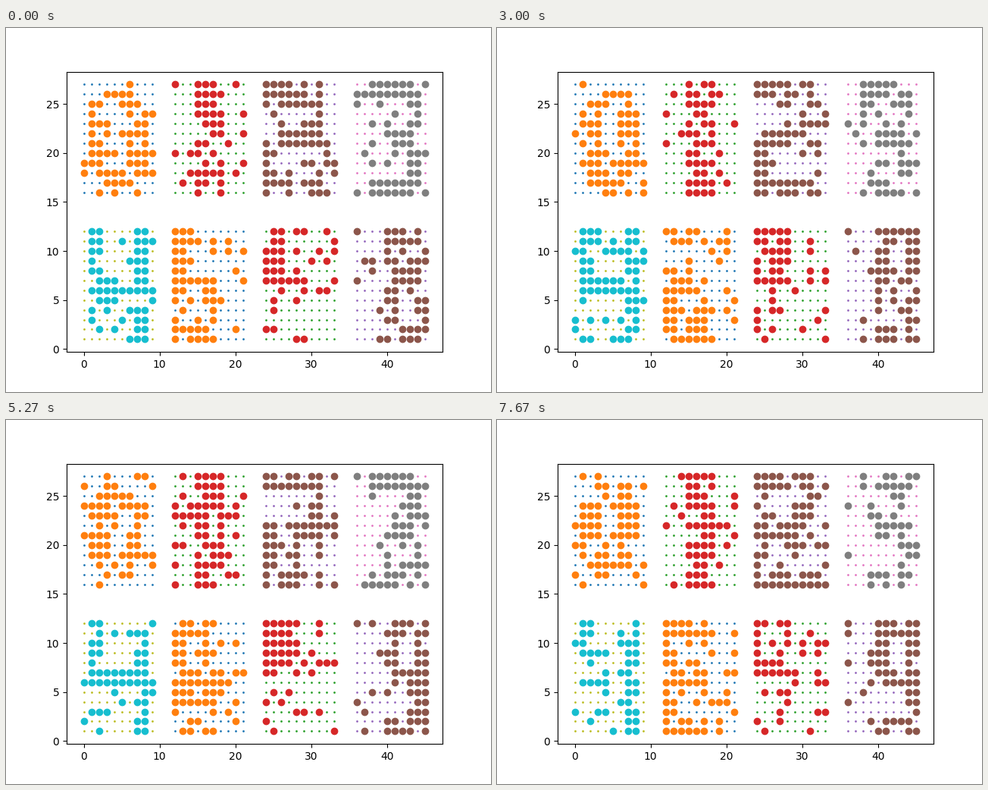
Animation, 640 px wide and 480 px high, one loop 7.81 s. Source, as a matplotlib script:

```python
import numpy as np
import matplotlib.pyplot as plt
from matplotlib.animation import FuncAnimation

ROWS, COLS = 12, 10
LOOP, STEP = 7810, 22          # ms
FLIP = 0.2                     # chance that a cell is inverted


def make_glyphs():
    """Digits 0 1 2 3 / 4 6 block 9, built from bars and stems."""
    r, c = np.indices((ROWS, COLS))
    dx, dy = abs(c - 4.5), abs(r - 5.5)
    upper, lower = r < 5, r > 6
    ends, middle = dy > 4, dy < 1
    bars = ends | middle

    def span(first, last):
        return (c >= first) & (c <= last)

    zero = (dx <= np.minimum(3.5, 6 - dy)) & (dy < 5) & ~((dx < 1) & (dy < 3))
    one = dx < 2
    two = bars & span(0, 7) | upper & span(6, 7) | lower & span(0, 1)
    three = (ends & span(2, 7) | middle & span(4, 7)
             | ~middle & (dy < 5) & span(7, 8))
    four = middle & span(1, 8) | span(7, 8) | upper & span(1, 2)
    six = bars & span(0, 5) | span(0, 1) | lower & span(4, 5)
    block = (r < 6) & span(0, 4)
    nine = six[::-1, ::-1]
    return [zero, one, two, three, four, six, block, nine]


def change_times():
    """Each pose lasts two ticks of 1/15 s, a few last three."""
    long_holds = {18, 31, 42, 49, 66, 85, 104}
    tick, times = 12, []
    while tick < 117:
        times.append(round(tick * 100 / 15) * 10)
        tick += 3 if tick in long_holds else 2
    return times


glyphs = make_glyphs()
times = change_times()
rng = np.random.default_rng(7)
noise = rng.random((len(times) + 1, len(glyphs), ROWS, COLS)) < FLIP

fig, ax = plt.subplots(figsize=(6.4, 4.8), dpi=100)

panels = []
for i, cells in enumerate(glyphs):
    x, y = np.meshgrid(np.arange(COLS) + 12 * (i % 4),
                       (27 if i < 4 else 12) - np.arange(ROWS))
    points = np.stack([x, y], axis=-1)
    ax.plot(x.ravel(), y.ravel(), "o", ms=1, color=f"C{2 * i % 10}", zorder=1)
    dots = ax.scatter(x, y, s=36, color=f"C{(2 * i + 1) % 10}", zorder=2)
    panels.append((cells, points, dots))


def update(n):
    pose = np.searchsorted(times, n * STEP + STEP / 2, side="right")
    for (cells, points, dots), flips in zip(panels, noise[pose]):
        dots.set_offsets(points[cells ^ flips])
    return [dots for *_, dots in panels]


anim = FuncAnimation(fig, update, frames=LOOP // STEP, interval=STEP,
                     repeat=True, repeat_delay=0)
plt.show()
```
